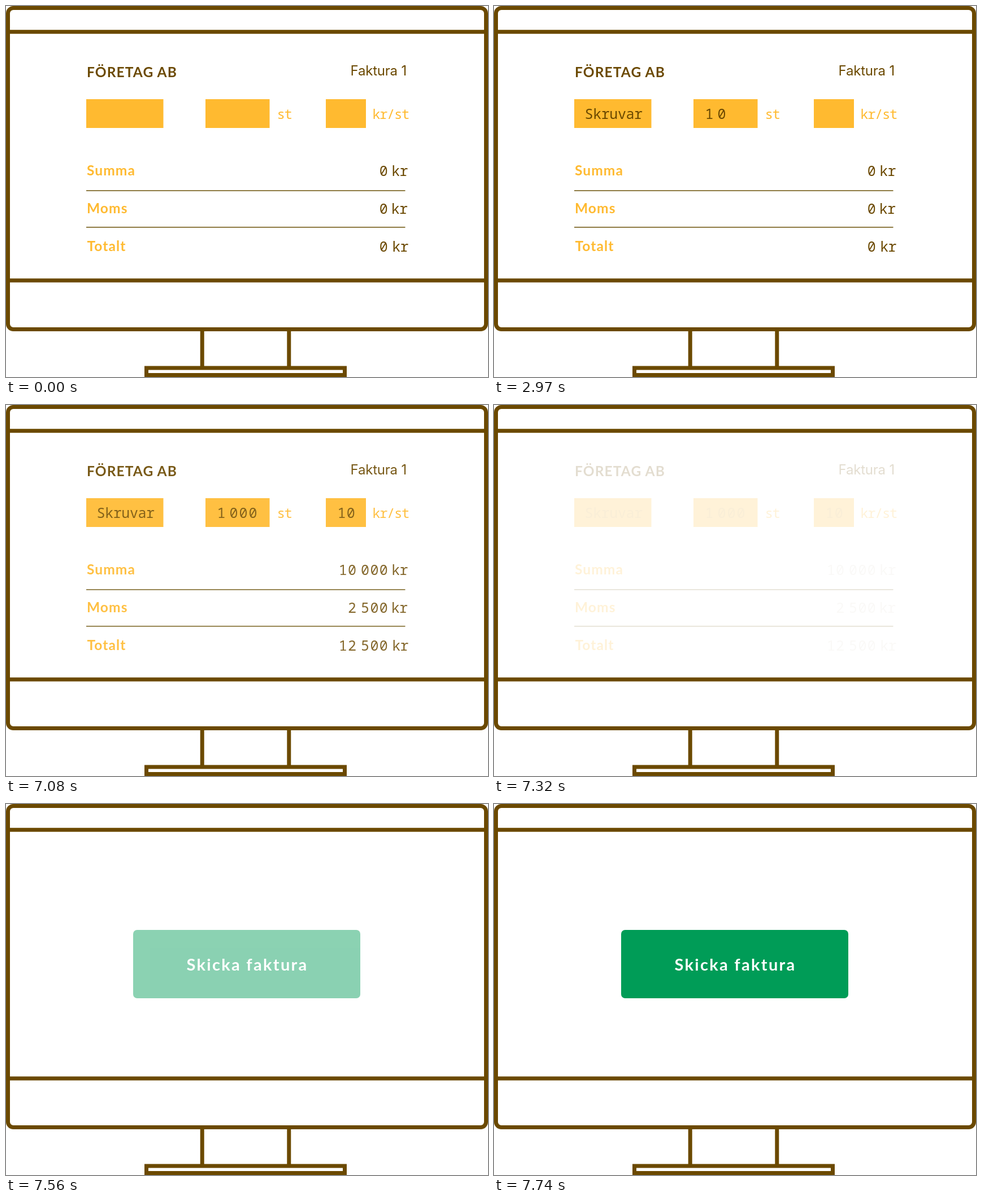
An HTML page for the animation above (8 s loop, 853 by 657 pixels).

```html
<!DOCTYPE html>
<html lang="sv">
<head>
<meta charset="utf-8">
<style>
  html, body { margin: 0; height: 100%; overflow: hidden; background: #fff; }
  svg { display: block; }
  .frame { fill: none; stroke: #6b4900; stroke-width: 7; }
  .rule { stroke: #6b5208; stroke-width: 1.6; }
  .box, .label, .unit { fill: #ffba30; }
  .head, .mono { fill: #6b4900; }
  .bold { font: 700 24.5px Lato, sans-serif; letter-spacing: 1.1px; }
  .plain { font: 24px Inter, sans-serif; letter-spacing: -.2px; }
  .mono, .unit { font: 25px "Noto Sans Mono", monospace; }
  .mono { letter-spacing: 1.3px; word-spacing: -9.6px; }
  .unit { font-size: 24px; letter-spacing: -1.4px; }
  #item, .kr { letter-spacing: -.4px; }
  #count { letter-spacing: 2px; word-spacing: -12px; }
  .end { text-anchor: end; }
  .send { font: 700 29px Lato, sans-serif; letter-spacing: 2.3px; text-anchor: middle; fill: #fff; }
</style>
</head>
<body>
<svg width="853" height="657" viewBox="0 0 853 657">
  <g class="frame">
    <rect x="3.5" y="3.5" width="846" height="569" rx="9.5"/>
    <path d="M3 45.7H850M3 486H850M347.2 573V641M500.8 573V641"/>
    <rect x="248.5" y="641" width="351" height="12.5"/>
  </g>

  <g id="invoice">
    <text class="head bold" x="143" y="125.5">FÖRETAG AB</text>
    <text class="head plain end" x="709" y="123">Faktura 1</text>
    <path class="box" d="M142 165h136.500v51h-136.500zM353 165h113.500v51h-113.500zM566 165h71v51h-71z"/>
    <text class="unit" x="479.500" y="200">st</text>
    <text class="unit" x="648" y="200">kr/st</text>
    <path class="rule" d="M142 327H706.500M142 391.700H706.500"/>
    <text class="label bold" x="143" y="299.500">Summa</text>
    <text class="label bold" x="143" y="367">Moms</text>
    <text class="label bold" x="143.500" y="434">Totalt</text>
    <g id="values" class="mono">
      <text id="item" x="160.500" y="200"></text>
      <text id="count" x="373.500" y="200"></text>
      <text id="price" x="586.500" y="200"></text>
      <text id="sum" class="end" x="677" y="300.500"></text>
      <text id="vat" class="end" x="677" y="367.500"></text>
      <text id="total" class="end" x="677" y="435"></text>
      <text class="kr" x="682" y="300.500">kr</text>
      <text class="kr" x="681.500" y="367.500">kr</text>
      <text class="kr" x="683" y="435">kr</text>
    </g>
  </g>

  <g id="button">
    <rect x="225" y="223" width="402" height="121" rx="7" fill="#009c57"/>
    <text class="send" x="427" y="295">Skicka faktura</text>
  </g>
</svg>
<script>
const LOOP = 8000, STEP = 30, FADE_STEPS = 11;
const $ = id => document.getElementById(id);

// Number of events passed by time t, for events at start, start + gap, ...
const steps = (t, start, gap, max) =>
  Math.max(0, Math.min(max, Math.floor((t - start) / gap) + 1));

const group = n => String(n).replace(/\B(?=(\d{3})+$)/g, ' ');

function write(id, text) {
  if ($(id).textContent !== text) $(id).textContent = text;
}

function draw(t) {
  write('item', 'Skruvar'.slice(0, steps(t, 700, 200, 7)));
  const digits = steps(t, 2600, 370, 4);
  write('count', '1 000'.slice(0, digits > 1 ? digits + 1 : digits));
  const price = '10'.slice(0, steps(t, 4080, 1000, 2));
  write('price', price);

  const sum = 1000 * price;
  write('sum', group(sum));
  write('vat', group(sum * .25));
  write('total', group(sum * 1.25));

  // The values fade inside the fading invoice, so they vanish sooner.
  const left = 1 - steps(t, 7080, STEP, FADE_STEPS) / FADE_STEPS;
  $('invoice').style.opacity = left;
  $('values').style.opacity = left;
  $('button').style.opacity = steps(t, 7440, STEP, FADE_STEPS) / FADE_STEPS;
}

const start = performance.now();
function tick() {
  draw((performance.now() - start) % LOOP);
  requestAnimationFrame(tick);
}
tick();
</script>
</body>
</html>
```
